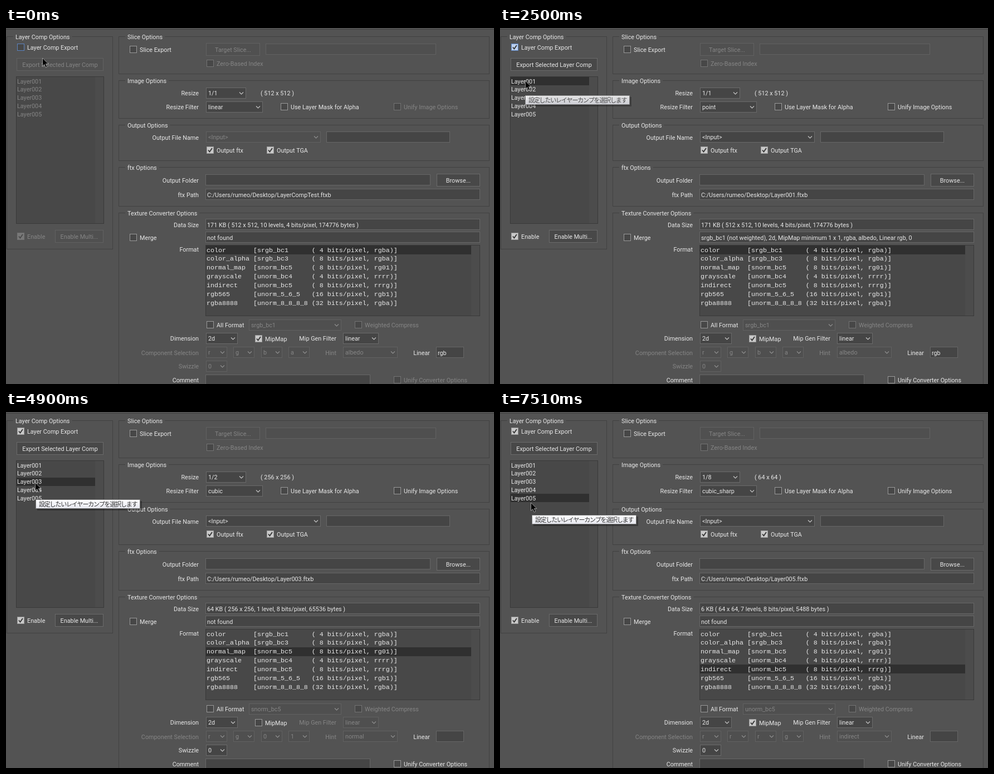
These frames come from a looping animation (876x640 px, 8 s). An HTML page with a canvas:

```html
<!DOCTYPE html>
<html lang="ja">
<meta charset="utf-8">
<style>
  html, body { margin: 0; width: 100%; height: 100%; overflow: hidden; background: #535353 }
  canvas { display: block }
</style>
<canvas id="stage" width="876" height="640"></canvas>
<script>
const ctx = document.getElementById('stage').getContext('2d');
const LOOP = 8000, STEP = 109;
const UI = '10.8px Roboto, sans-serif';
const MONO = '11.67px "Liberation Mono", monospace';
const JP = '11px "Noto Sans CJK JP", "Noto Sans CJK", sans-serif';
const ON = '#e8e8e8', OFF = '#858585';

// One entry per selected layer; the first is the panel with layer comps off.
const base = {
  size: '1/1', px: '512 x 512', filter: 'linear', file: 'LayerCompTest',
  data: '171 KB ( 512 x 512, 10 levels, 4 bits/pixel, 174776 bytes )',
  merge: 'not found', format: 0, code: 'srgb_bc1', dim: '2d', mip: true,
  mipFilter: 'linear', comps: 'rgba', hint: 'albedo', linear: 'rgb', swizzle: false
};
const states = [
  {},
  { filter: 'point', merge: 'srgb_bc1 (not weighted), 2d, MipMap minimum 1 x 1, rgba, albedo, Linear rgb, 0' },
  { size: '3/4', px: '384 x 384', format: 1, code: 'srgb_bc3', dim: '1d',
    data: '4 KB ( 384 x 1, 9 levels, 8 bits/pixel, 3088 bytes )' },
  { size: '1/2', px: '256 x 256', filter: 'cubic', format: 2, code: 'snorm_bc5', mip: false,
    comps: 'rg01', hint: 'normal', linear: '', swizzle: true,
    data: '64 KB ( 256 x 256, 1 level, 8 bits/pixel, 65536 bytes )' },
  { size: '1/4', px: '128 x 128', filter: 'cubic_smooth', format: 3, code: 'unorm_bc4',
    mipFilter: 'cubic', comps: 'rrrr', hint: 'specular', swizzle: true,
    data: '11 KB ( 128 x 128, 8 levels, 4 bits/pixel, 10936 bytes )' },
  { size: '1/8', px: '64 x 64', filter: 'cubic_sharp', format: 4, code: 'unorm_bc5',
    comps: 'rrrg', hint: 'indirect', linear: '', swizzle: true,
    data: '6 KB ( 64 x 64, 7 levels, 8 bits/pixel, 5488 bytes )' }
].map((s, i) => ({ ...base, file: i ? 'Layer00' + i : base.file, ...s }));

const formats = [
  'color       [srgb_bc1      ( 4 bits/pixel, rgba)]',
  'color_alpha [srgb_bc3      ( 8 bits/pixel, rgba)]',
  'normal_map  [snorm_bc5     ( 8 bits/pixel, rg01)]',
  'grayscale   [unorm_bc4     ( 4 bits/pixel, rrrr)]',
  'indirect    [unorm_bc5     ( 8 bits/pixel, rrrg)]',
  'rgb565      [unorm_5_6_5   (16 bits/pixel, rgb1)]',
  'rgba8888    [unorm_8_8_8_8 (32 bits/pixel, rgba)]'
];

const clicks = [0, 11, 28, 40, 53, 65];
const path = [
  [1, 65, 54], [5, 35, 43], [8, 28, 34], [16, 28, 34], [18, 31, 46], [23, 45, 95],
  [24, 46, 98], [27, 48, 110], [31, 48, 110], [36, 51, 124], [44, 51, 124], [45, 52, 127],
  [49, 54, 140], [57, 54, 141], [59, 54, 147], [60, 54, 149], [62, 54, 153], [66, 54, 153], [69, 55, 163]
];
const tipExport = 'レイヤーカンプごとの設定を有効にして書き出しできるようにします';
const tipSelect = '設定したいレイヤーカンプを選択します';
const tips = [
  [6, 10, 36, 75, tipExport], [13, 17, 29, 66, tipExport], [22, 27, 45, 121, tipSelect],
  [29, 40, 50, 142, tipSelect], [41, 53, 53, 157, tipSelect], [54, 65, 55, 173, tipSelect],
  [66, 99, 57, 185, tipSelect]
];

function text(s, x, y, color = ON, align = 'left', font = UI) {
  ctx.font = font;
  ctx.fillStyle = color;
  ctx.textAlign = align;
  ctx.fillText(s, x, y + 4);
}

function rect(x, y, r, b, fill, stroke) {
  if (fill) { ctx.fillStyle = fill; ctx.fillRect(x, y, r - x, b - y); }
  if (stroke) {
    ctx.strokeStyle = stroke;
    ctx.lineWidth = 1;
    ctx.strokeRect(x + .5, y + .5, r - x - 1, b - y - 1);
  }
}

function line(color, width, ...points) {
  ctx.strokeStyle = color;
  ctx.lineWidth = width;
  ctx.beginPath();
  points.forEach(([x, y]) => ctx.lineTo(x, y));
  ctx.stroke();
}

function group(title, x, y, r, b) {
  rect(x, y, r, b, null, '#414141');
  ctx.font = UI;
  rect(x + 12, y, x + 20 + ctx.measureText(title).width, y + 1, '#535353');
  text(title, x + 16, y + 1);
}

const label = (s, r, y, on = true) => text(s, r, y, on ? ON : OFF, 'right');

function button(s, x, y, r, b, on = true) {
  rect(x, y, r, b, on ? '#484848' : '#505050', on ? '#6a6a6a' : '#616161');
  text(s, (x + r) / 2, (y + b) / 2, on ? ON : OFF, 'center');
}

function field(x, y, r, b, value = '', on = true) {
  rect(x, y, r, b, on ? '#454545' : '#4f4f4f', on ? '#666' : '#616161');
  text(value, x + 3, (y + b) / 2 + .5);
}

function combo(x, y, r, value, on = true) {
  rect(x, y, r, y + 20, on ? '#454545' : '#4f4f4f', on ? '#6a6a6a' : '#616161');
  text(value, x + 4, y + 10, on ? ON : OFF);
  line(on ? '#c8c8c8' : '#909090', 1.1, [r - 12, y + 8.5], [r - 8.5, y + 12], [r - 5, y + 8.5]);
}

function check(s, x, y, checked, on = true, focus = false) {
  const edge = focus ? '#5b83c0' : on ? '#999' : '#737373';
  const fill = !checked ? '#474747' : !on ? '#787878' : focus ? '#bcd0ee' : '#c9c9c9';
  rect(x - 6, y - 6, x + 7, y + 7, fill, edge);
  if (checked) line(on ? '#333' : '#4a4a4a', 1.8, [x - 3, y + .5], [x - .5, y + 3.5], [x + 4, y - 3]);
  text(s, x + 12, y + 1, on ? ON : OFF);
}

function list(rows, x, y, r, b, pitch, selected, color, font) {
  rect(x, y, r, b, '#484848', '#393939');
  rect(r - 16, y + 1, r - 1, b - 1, '#4c4c4c');
  rows.forEach((row, i) => {
    const top = Math.round(y + 1 + i * pitch);
    if (i === selected) rect(x + 1, top, r - 16, top + Math.round(pitch), '#303030');
    text(row, x + 2, Math.round(y + 8.6 + i * pitch), color, 'left', font);
  });
}

function layerPanel(index, focus) {
  const on = index > 0;
  group('Layer Comp Options', 1, 15, 192, 398);
  check('Layer Comp Export', 26, 34, on, true, focus);
  button('Export Selected Layer Comp', 19, 54, 175, 77, on);
  list([1, 2, 3, 4, 5].map(n => 'Layer00' + n), 18, 87, 176, 352, 14.75, index - 1, on ? ON : OFF);
  check('Enable', 26, 374, true, on);
  button('Enable Multi...', 88, 363, 175, 386, on);
}

function optionPanels(s, on) {
  group('Slice Options', 202, 15, 868, 83);
  check('Slice Export', 228, 38, false);
  button('Target Slice...', 359, 27, 456, 50, false);
  field(466, 28, 772, 48, '', false);
  check('Zero-Based Index', 366, 63, false, false);

  group('Image Options', 202, 94, 868, 163);
  label('Resize', 346, 117);
  combo(359, 107, 431, s.size);
  text(`( ${s.px} )`, 457, 117);
  label('Resize Filter', 346, 142);
  combo(359, 132, 461, s.filter);
  check('Use Layer Mask for Alpha', 499, 141, false);
  check('Unify Image Options', 702, 141, false, on);

  group('Output Options', 202, 174, 868, 239);
  label('Output File Name', 346, 197);
  combo(359, 186, 565, '<Input>', on);
  field(575, 186, 797, 206);
  check('Output ftx', 366, 219, true);
  check('Output TGA', 474, 219, true);

  group('ftx Options', 202, 250, 868, 321);
  label('Output Folder', 346, 274);
  field(358, 263, 762, 283);
  button('Browse...', 773, 262, 851, 285);
  label('ftx Path', 346, 300);
  field(358, 289, 851, 309, `C:/Users/rumeo/Desktop/${s.file}.ftxb`);
}

function converterPanel(s, on) {
  group('Texture Converter Options', 202, 332, 868, 660);
  label('Data Size', 346, 354);
  field(358, 343, 851, 363, s.data);
  check('Merge', 228, 376, false);
  field(358, 366, 851, 386, s.merge);
  label('Format', 346, 398);
  list(formats, 358, 390, 851, 518, 15.83, s.format, ON, MONO);
  check('All Format', 366, 533, false);
  combo(436, 524, 602, s.code, false);
  check('Weighted Compress', 632, 533, false, false);
  label('Dimension', 346, 558);
  combo(359, 548, 416, s.dim);
  check('MipMap', 453, 558, s.mip);
  label('Mip Gen Filter', 593, 558, s.mip);
  combo(605, 548, 669, s.mipFilter, s.mip);
  label('Component Selection', 346, 584, false);
  [...s.comps].forEach((c, i) => combo(Math.round(359 + i * 49.4), 573, Math.round(397 + i * 49.4), c, false));
  label('Hint', 593, 584, false);
  combo(605, 573, 703, s.hint, false);
  label('Linear', 761, 584);
  field(772, 573, 822, 593, s.linear);
  label('Swizzle', 346, 608, s.swizzle);
  combo(359, 598, 397, '0', s.swizzle);
  label('Comment', 346, 633);
  field(358, 623, 654, 645);
  check('Unify Converter Options', 702, 632, false, on);
}

function tooltip(step) {
  const tip = tips.find(([from, to]) => step >= from && step < to);
  if (!tip) return;
  const [from, , x, y, s] = tip;
  ctx.save();
  ctx.globalAlpha = Math.min(1, (step - from + 1) * .43);
  ctx.letterSpacing = '-1.2px';
  ctx.font = JP;
  const r = Math.round(x + 12 + ctx.measureText(s).width), b = y + 17;
  rect(x + 3, y + 3, r + 3, b + 3, 'rgba(0,0,0,.3)');
  const shade = ctx.createLinearGradient(0, y, 0, b);
  shade.addColorStop(0, '#fff');
  shade.addColorStop(1, '#e5e6ee');
  rect(x, y, r, b, shade, '#777');
  text(s, x + 6, y + 8.5, '#333', 'left', JP);
  ctx.restore();
}

function cursor(step) {
  const last = path[path.length - 1];
  const i = path.findIndex(p => p[0] > step);
  const a = i === 0 ? path[0] : i < 0 ? last : path[i - 1];
  const b = i < 0 ? last : path[i];
  const k = b[0] > a[0] ? Math.max(0, (step - a[0]) / (b[0] - a[0])) : 0;
  ctx.save();
  ctx.translate(Math.round(a[1] + (b[1] - a[1]) * k) + .5, Math.round(a[2] + (b[2] - a[2]) * k));
  const arrow = new Path2D('M0 0V14.5L3.3 11.5L5.8 17L8.3 16L5.9 10.6H10.5Z');
  ctx.fillStyle = '#000';
  ctx.strokeStyle = '#b5b5b5';
  ctx.lineWidth = .8;
  ctx.fill(arrow);
  ctx.stroke(arrow);
  ctx.restore();
}

function draw() {
  const step = Math.floor((performance.now() % LOOP + 14) / STEP);
  const index = clicks.filter(c => step >= c).length - 1;
  rect(0, 0, 876, 640, '#535353');
  rect(0, 2, 876, 3, '#414141');
  layerPanel(index, index < 2);
  optionPanels(states[index], index > 0);
  converterPanel(states[index], index > 0);
  tooltip(step);
  cursor(step);
  requestAnimationFrame(draw);
}
draw();
</script>
</html>
```
